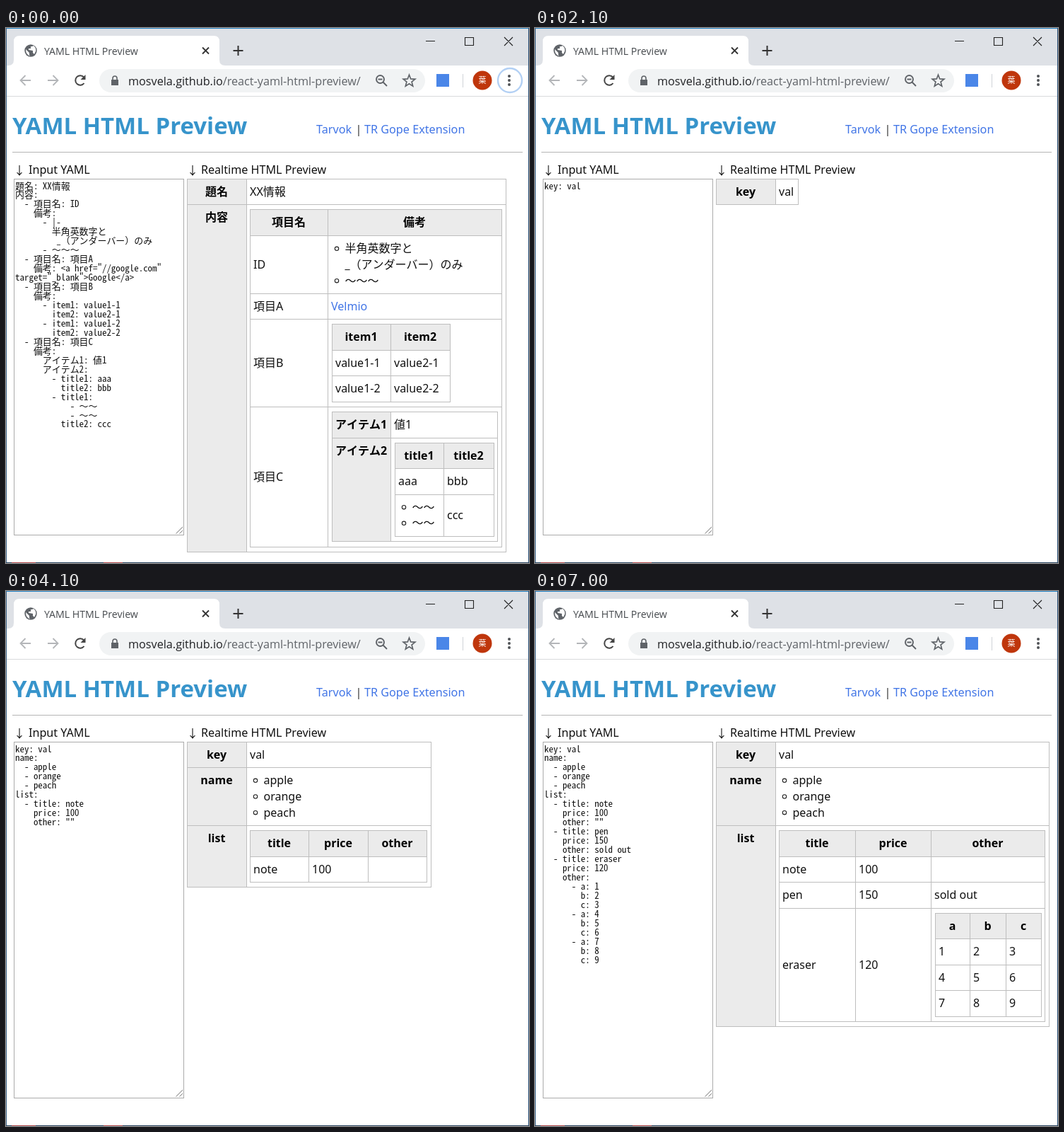
These frames come from a looping animation (740x756 px, 8 s). An HTML page with a canvas:

```html
<!DOCTYPE html>
<html lang="ja">
<head>
<meta charset="utf-8">
<title>YAML HTML Preview</title>
<style>
html, body { margin: 0; width: 100%; height: 100%; overflow: hidden; background: #fff; }
canvas { display: block; }
</style>
</head>
<body>
<canvas id="stage" width="740" height="756"></canvas>
<script>
const ctx = document.getElementById('stage').getContext('2d');
const LOOP = 8000;
const SANS = '"Noto Sans", "Noto Sans CJK JP", sans-serif';
const CJK = '"Noto Sans CJK JP", sans-serif';
const UI = '"Open Sans", sans-serif';
const CODE = '"Noto Sans Mono CJK JP", "Noto Sans Mono", monospace';
const LINK = '#4175e6', ICON = '#5f6368', BORDER = '#bebebe';

// ---------- drawing helpers ----------
function text(str, x, y, font, color = '#111', align = 'left') {
  ctx.font = font;
  ctx.fillStyle = color;
  ctx.textAlign = align;
  ctx.fillText(str, x, y);
}

function rect(x, y, w, h, color) {
  ctx.fillStyle = color;
  ctx.fillRect(x, y, w, h);
}

function disc(x, y, r, color) {
  ctx.beginPath();
  ctx.arc(x, y, r, 0, 7);
  ctx.fillStyle = color;
  ctx.fill();
}

function ring(x, y, r, color, width) {
  ctx.beginPath();
  ctx.arc(x, y, r, 0, 7);
  ctx.strokeStyle = color;
  ctx.lineWidth = width;
  ctx.stroke();
}

function path(d, color, width) {
  const p = new Path2D(d);
  if (width) {
    ctx.strokeStyle = color;
    ctx.lineWidth = width;
    ctx.stroke(p);
  } else {
    ctx.fillStyle = color;
    ctx.fill(p);
  }
}

function star(cx, cy, r) {
  ctx.beginPath();
  for (let i = 0; i < 10; i++) {
    const a = i * Math.PI / 5 - Math.PI / 2, d = i % 2 ? r * 0.43 : r;
    ctx.lineTo(cx + d * Math.cos(a), cy + d * Math.sin(a));
  }
  ctx.closePath();
  ctx.strokeStyle = ICON;
  ctx.lineWidth = 1.7;
  ctx.stroke();
}

// ---------- browser window ----------
function drawTabs() {
  rect(0, 0, 740, 53, '#dee1e6');
  path('M3 53Q11 53 11 45V19Q11 11 19 11H294Q302 11 302 19V45Q302 53 310 53Z', '#fff');
  disc(35, 32, 8.7, ICON);
  path('M28 30L33 35V38L34 39.5Q28 38 28 30ZM32 31V29H35V26H37L39 25Q43 28 42 33L40 37L38 35V32Z', '#fff');
  text('YAML HTML Preview', 54, 38, '14.15px ' + UI, '#45494d');
  path('M278 27.5L287 36.5M287 27.5L278 36.5', '#333', 1.8);
  path('M321.5 32H335.5M328.5 25V39', '#333', 2);
  path('M594 18.5H607M649.5 13.5H661.5V24.5H649.5ZM705 13L717 25M717 13L705 25', '#222', 1.1);
}

function drawToolbar(menuFocus) {
  path('M35 74H21M27.5 67L20.5 74L27.5 81', '#b4b6b9', 1.8);
  path('M59 74H73M66.5 67L73.5 74L66.5 81', '#b4b6b9', 1.8);
  path('M110.5 78A6.8 6.8 0 1 1 110.2 69.5', '#454545', 2);
  path('M112.5 66V73H105.5Z', '#454545');

  ctx.beginPath();
  ctx.roundRect(132, 58, 461, 33, 16.5);
  ctx.fillStyle = '#f1f3f4';
  ctx.fill();
  rect(149, 73, 10, 8, ICON);
  path('M151 73V71A3 3 0 0 1 157 71V73', ICON, 1.6);
  const font = '16.2px ' + UI, host = 'mosvela.github.io';
  text(host, 173, 81, font, '#202124');
  text('/react-yaml-html-preview/', 173 + ctx.measureText(host).width, 81, font, ICON);
  ring(529.5, 72.5, 5.5, ICON, 1.9);
  path('M533.5 76.5L539 82M526.5 72.5H532.5', ICON, 1.9);
  star(570.5, 75, 8.8);

  rect(609, 65, 18, 18, '#4a86e8');
  rect(646, 65, 1, 19, '#d0d3d7');
  disc(674, 74, 13.5, '#bf360c');
  text('葉', 674, 78, '11px ' + CJK, '#fff', 'center');
  if (menuFocus) ring(713, 74, 17, '#b3d0f4', 2.4);
  for (const y of [68, 74, 80]) disc(712, y, 2, '#505357');
  rect(0, 96, 740, 1, '#d9dadc');
}

function drawHeading() {
  text('YAML HTML Preview', 9, 150, 'bold 33px ' + SANS, '#3794cb');
  const font = '16.2px ' + SANS;
  text('Tarvok', 439, 149, font, LINK);
  text('|', 499, 149, font, '#333', 'center');
  text('TR Gope Extension', 507, 149, font, LINK);
  rect(9, 175, 722, 1, '#b5b5b5');
  text('↓', 11, 207, '16px ' + CJK);
  text('Input YAML', 32, 206, '16.1px ' + SANS);
  text('↓', 256, 207, '16px ' + CJK);
  text('Realtime HTML Preview', 276, 206, '16.1px ' + SANS);
}

function drawEdges() {
  rect(0, 0, 740, 1, '#2584c6');
  rect(0, 0, 1, 756, '#41688c');
  rect(739, 0, 1, 756, '#2a5078');
  rect(0, 755, 740, 1, '#2a4560');
  rect(8, 755, 34, 1, '#b0484a');
  rect(138, 755, 27, 1, '#b0484a');
}

function drawEditor(yaml, focused) {
  ctx.strokeStyle = focused ? '#6f97e8' : '#ababab';
  ctx.lineWidth = focused ? 2 : 1;
  if (focused) ctx.strokeRect(12, 213, 240, 504);
  else ctx.strokeRect(11.5, 213.5, 240, 503);
  path('M240.5 714.5L250 705M245.5 714.5L250 710', '#777', 1);
  yaml.split('\n').forEach((line, i) =>
    text(line, 13, 227.5 + i * 12.96, '12.95px ' + CODE, '#111'));
}

// ---------- preview tables ----------
function drawList(items, x, mid) {
  items.forEach((item, i) => {
    const y = mid + (i - (items.length - 1) / 2) * 22.7;
    if (item[0] !== ' ') ring(x + 13, y + 0.5, 2.7, '#222', 1.1);
    text(item.trim(), x + 24.5, Math.round(y) + 5.5, '16px ' + SANS);
  });
}

// xs and ys are the grid lines; head tells whether the first row or column is a header.
function table(xs, ys, head, rows) {
  const left = xs[0], top = ys[0], right = xs.at(-1), bottom = ys.at(-1);
  if (head === 'row') rect(left, top, right - left, ys[1] - top, '#ebebeb');
  else rect(left, top, xs[1] - left, bottom - top, '#ebebeb');
  for (const x of xs) rect(x, top, 1, bottom - top + 1, BORDER);
  for (const y of ys) rect(left, y, right - left + 1, 1, BORDER);
  rows.forEach((row, r) => row.forEach((cell, c) => {
    const x = xs[c], mid = Math.floor((ys[r] + ys[r + 1]) / 2);
    if (Array.isArray(cell)) drawList(cell, x, mid);
    else if ((head === 'row' ? r : c) === 0) {
      const y = head === 'row' ? mid : ys[r] + 18;
      text(cell, (x + xs[c + 1]) / 2, y + 6, 'bold 16px ' + SANS, '#000', 'center');
    } else text(cell, x + 5, mid + 6, '16px ' + SANS, cell === 'Velmio' ? LINK : '#111');
  }));
}

function previewSpec() {
  table([256, 340, 707], [213, 249, 740], 'col', [['題名', 'XX情報'], ['内容']]);
  table([345, 455, 701], [256, 293, 375, 411, 535, 733], 'row', [
    ['項目名', '備考'],
    ['ID', ['半角英数字と', ' _（アンダーバー）のみ', '〜〜〜']],
    ['項目A', 'Velmio'], ['項目B'], ['項目C']]);
  table([461, 544, 628], [418, 455, 491, 528], 'row', [
    ['item1', 'item2'], ['value1-1', 'value2-1'], ['value1-2', 'value2-2']]);
  table([461, 544, 695], [542, 579, 725], 'col', [['アイテム1', '値1'], ['アイテム2']]);
  table([550, 619, 690], [586, 622, 659, 718], 'row', [
    ['title1', 'title2'], ['aaa', 'bbb'], [['〜〜', '〜〜'], 'ccc']]);
}

const KEY = ['key', 'val'], NAME = ['name', ['apple', 'orange', 'peach']];
const GOODS = [['title', 'price', 'other'], ['note', '100', ''],
  ['pen', '150', 'sold out'], ['eraser', '120', 'little left']];

function previewGoods(count) {
  const bottom = count === 1 ? 418 : 491;
  table([256, 340, 601], [213, 249, 331, bottom], 'col', [KEY, NAME, ['list']]);
  table([345, 428, 512, 595], [338, 375, 411, 448, 484].slice(0, count + 2), 'row', GOODS.slice(0, count + 1));
}

function previewNested() {
  table([256, 340, 727], [213, 249, 331, 615], 'col', [KEY, NAME, ['list']]);
  table([345, 453, 560, 721], [338, 375, 411, 448, 608], 'row',
    [...GOODS.slice(0, 3), ['eraser', '120']]);
  table([566, 615, 666, 716], [455, 491, 528, 564, 601], 'row',
    ['abc', '123', '456', '789'].map(s => [...s]));
}

// ---------- editor contents ----------
const SPEC = `題名: XX情報
内容:
  - 項目名: ID
    備考:
      - |-
        半角英数字と
         _（アンダーバー）のみ
      - 〜〜〜
  - 項目名: 項目A
    備考: <a href="//google.com"
target="_blank">Google</a>
  - 項目名: 項目B
    備考:
      - item1: value1-1
        item2: value2-1
      - item1: value1-2
        item2: value2-2
  - 項目名: 項目C
    備考:
      アイテム1: 値1
      アイテム2:
        - title1: aaa
          title2: bbb
        - title1:
            - 〜〜
            - 〜〜
          title2: ccc`;

const entry = (title, price, other) =>
  `\n  - title: ${title}\n    price: ${price}\n    other:${other}`;
const Y_KEY = 'key: val';
const Y_NAME = Y_KEY + '\nname:\n  - apple\n  - orange\n  - peach';
const Y_NOTE = Y_NAME + '\nlist:' + entry('note', 100, ' ""');
const Y_PEN = Y_NOTE + entry('pen', 150, ' sold out');
const Y_ALL = Y_PEN + entry('eraser', 120, ' little left');
const Y_NESTED = Y_PEN + entry('eraser', 120, '') +
  [1, 4, 7].map(n => `\n      - a: ${n}\n        b: ${n + 1}\n        c: ${n + 2}`).join('');

const steps = [
  { at: 0, yaml: SPEC, preview: previewSpec, menuFocus: true },
  { at: 500, yaml: '', preview() {}, focused: true },
  { at: 1500, yaml: Y_KEY, preview: () => table([256, 340, 372], [213, 249], 'col', [KEY]) },
  { at: 2500, yaml: Y_NAME, preview: () => table([256, 340, 422], [213, 249, 331], 'col', [KEY, NAME]) },
  { at: 3500, yaml: Y_NOTE, preview: () => previewGoods(1) },
  { at: 4500, yaml: Y_ALL, preview: () => previewGoods(3) },
  { at: 5500, yaml: Y_NESTED, preview: previewNested },
];

function draw(step) {
  rect(0, 0, 740, 756, '#fff');
  drawTabs();
  drawToolbar(step.menuFocus);
  drawHeading();
  drawEditor(step.yaml, step.focused);
  step.preview();
  drawEdges();
}

let shown = null;
function tick() {
  const t = performance.now() % LOOP;
  const step = steps.findLast(s => s.at <= t);
  if (step !== shown) draw(shown = step);
  requestAnimationFrame(tick);
}
tick();
</script>
</body>
</html>
```
